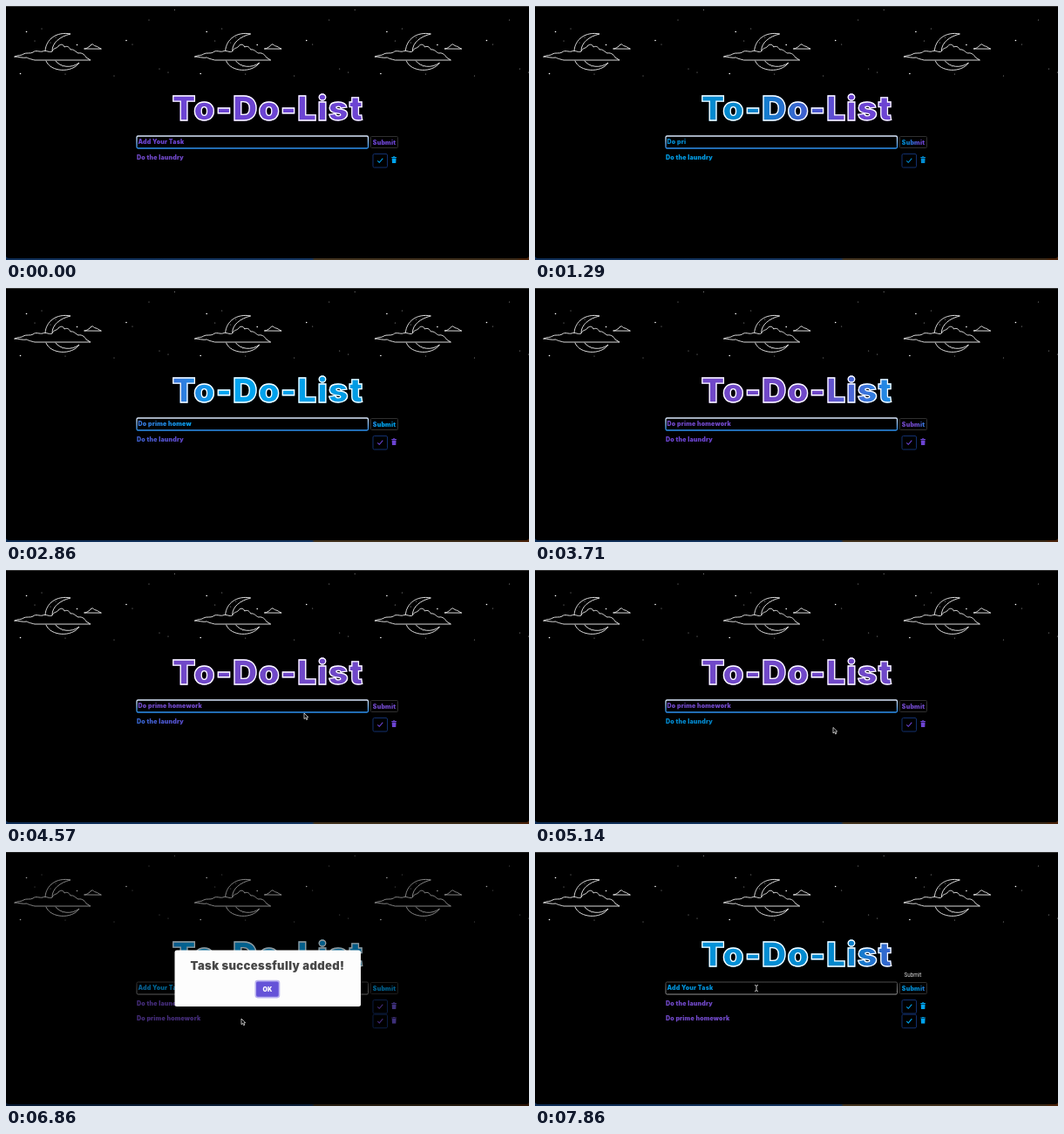
These frames come from a looping animation (600 px wide and 291 px high, 8000 ms). An HTML page:

```html
<!DOCTYPE html>
<html lang="en">
<head>
<meta charset="utf-8">
<title>To-Do-List</title>
<style>
  html, body { margin: 0; width: 100%; height: 100%; overflow: hidden; background: #000; }
  #stage { position: relative; width: 600px; height: 291px; overflow: hidden; background: #000; }
  svg { position: absolute; left: 0; top: 0; }
  .shine, text { font-family: Inter, "Liberation Sans", sans-serif; font-weight: 900; letter-spacing: .027em; }
  text { text-anchor: middle; }
  .shine {
    position: absolute; height: 14px; line-height: 14px; font-size: 7px;
    white-space: pre; color: transparent;
    background: linear-gradient(to right, #7048c8 20%, #00a5f0 30%, #0287cc 70%, #6c44d2 80%) 0 50% / 500% 100%;
    -webkit-background-clip: text; background-clip: text;
  }
  #title {
    left: 300.5px; top: 92px; height: 49px; line-height: 49px; font-size: 38.9px;
    transform: translateX(-50%); -webkit-text-stroke: 1.3px #fff;
  }
  #field { left: 150px; top: 149px; width: 266px; text-indent: 1.6px; }
  #submit { left: 418px; top: 149.5px; width: 32px; text-align: center; }
  .row { left: 150px; width: 300px; }
</style>
</head>
<body>
<div id="stage">
  <svg width="600" height="291" fill="none">
    <defs>
      <g id="sky">
        <g stroke="#f2f2f2" stroke-width=".9" stroke-linejoin="round" stroke-linecap="round">
          <path d="M45 51C46 38 58 29 74 32C62 35 53 42 53 51"/>
          <path d="M10 58C14 56 18 57 20 55C23 53 28 55 31 53C34 50 39 53 42 52C46 50 50 54 53 52C55 47 59 49 60 46C63 43 66 44 67 47C71 45 73 48 74 50C78 49 80 53 83 54C88 53 91 57 92 59L97 62H33C29 61 25 60 24 59C19 60 15 58 10 58Z"/>
          <path d="M46 63C51 76 76 77 84 65C75 72 62 70 57 63"/>
          <path d="M90 49C93 49 94 47 95 47L98 44C100 43 101 46 103 46C105 46 106 48 109 49Z"/>
        </g>
        <path id="stars" stroke="#fff" stroke-width="1.6" stroke-linecap="round"/>
        <path id="dimStars" stroke="#999" stroke-width="1.1" stroke-linecap="round"/>
      </g>
      <linearGradient id="focused" x2="0" y2="1">
        <stop stop-color="#dbe8fb"/><stop offset="1" stop-color="#2a8fee"/>
      </linearGradient>
      <linearGradient id="blurred" x2="0" y2="1">
        <stop stop-color="#4a4a4a"/><stop offset="1" stop-color="#959595"/>
      </linearGradient>
      <linearGradient id="dock">
        <stop stop-color="#0d2c55"/><stop offset=".585" stop-color="#143560"/>
        <stop offset=".59" stop-color="#43341f"/><stop offset=".975" stop-color="#3a2a18"/>
        <stop offset=".985" stop-color="#4a230a"/>
      </linearGradient>
    </defs>
    <path d="M0 .5H600" stroke="#343434"/>
    <rect y="287" width="600" height="4" fill="url(#dock)"/>
    <path d="M0 280V286Q0 289 4 289H596Q600 289 600 286V280Z" fill="#000"/>
    <use href="#sky"/><use href="#sky" x="206.7"/><use href="#sky" x="413.4"/>
    <rect id="box" x="150" y="149" width="265.5" height="14" rx="1.5"/>
    <rect x="418.5" y="149.5" width="31" height="13" rx="1" stroke="#303030"/>
    <g id="tools">
      <rect x="421" y="169.5" width="16.5" height="15.5" rx="1.5" stroke="#12306e"/>
      <path id="check" d="M426.3 177.3l2 2l4-4.7" stroke-width="1.1"/>
      <path id="bin" d="M442.3 173h1.6l.5-.7h1.5l.5.7h1.6v1h-5.7zM442.7 174.5h4.9l-.3 5.5h-4.3z"/>
    </g>
    <use id="tools2" href="#tools" y="16.6"/>
  </svg>

  <div id="title" class="shine main">To-Do-List</div>
  <div id="field" class="shine main"></div>
  <div id="submit" class="shine main">Submit</div>
  <div class="shine row" style="top:167px">Do the laundry</div>
  <div id="row2" class="shine row" style="top:183.6px">Do prime homework</div>

  <svg width="600" height="291" fill="none">
    <text id="tip" x="433.5" y="142.5" fill="#ddd" style="font:400 6.3px Roboto,sans-serif;letter-spacing:0">Submit</text>
    <rect id="shade" width="600" height="291" fill="#000"/>
    <g id="ask">
      <rect x="193.5" y="76.5" width="213.5" height="136.5" rx="2.5" fill="#fdfdfd"/>
      <!-- Success mark, in units of 1/5 of its inner size -->
      <g transform="translate(283 95) scale(6.8)" stroke="#a98a66" stroke-width=".25">
        <circle cx="2.5" cy="2.5" r="2.625" opacity=".3"/>
        <path id="arc"/>
        <g fill="#a98a66" stroke="none">
          <rect id="markTip" height=".3125" rx=".125"/>
          <rect id="markLong" height=".3125" rx=".125"/>
        </g>
      </g>
      <g font-size="13.4" fill="#484848">
        <text x="300" y="156.2">Do you want to add the</text><text x="300" y="171.2">task?</text>
      </g>
      <rect x="256.7" y="183.7" width="28.6" height="19.2" rx="2.5" fill="#b23ca8" stroke="#c9a6ec" stroke-width="1.6"/>
      <rect x="289" y="184" width="54" height="18.5" rx="2" fill="#d92a2a"/>
      <g font-size="7" fill="#fff">
        <text x="271" y="196">Yes</text><text x="316" y="196">No, cancel</text>
      </g>
    </g>
    <g id="done">
      <rect x="193.5" y="112.5" width="213.5" height="64.5" rx="2.5" fill="#fdfdfd"/>
      <text x="300" y="135" font-size="13.1" fill="#484848">Task successfully added!</text>
      <rect x="286.3" y="147.6" width="27.2" height="19" rx="2.5" fill="#6553d8" stroke="#b9b1f0" stroke-width="1.6"/>
      <text x="300" y="159.6" font-size="7" fill="#fff">OK</text>
    </g>
    <path id="arrow" d="M0 0V6.6L1.6 5.2L2.7 7.6L3.8 7.1L2.8 4.8L4.7 4.6Z" fill="#000" stroke="#fff" stroke-width=".7"/>
    <path id="beam" d="M-2-3.4Q0-3.4 0-2.4Q0-3.4 2-3.4M0-2.6V2.6M-2 3.4Q0 3.4 0 2.4Q0 3.4 2 3.4" stroke="#ddd" stroke-width=".9"/>
  </svg>
</div>
<script>
const LOOP = 8000, ASK = 5225, ADDED = 6430, CLOSE = 7300;
const TASK = "Do prime homework";
const $ = id => document.getElementById(id);
const clamp = x => Math.min(1, Math.max(0, x));
const show = (el, on) => { el.style.display = on ? "" : "none"; };
const setAttrs = (el, attrs) => Object.entries(attrs).forEach(([k, v]) => el.setAttribute(k, v));

const dots = list => list.map(([x, y]) => `M${x} ${y}h.01`).join("");
$("stars").setAttribute("d", dots([[23.5, 29.5], [81.5, 44.5], [16.5, 77.5], [138, 39.5]]));
$("dimStars").setAttribute("d", dots([[41, 26], [33, 40], [145, 44], [193.5, 4.5],
  [164, 16], [176, 72], [124, 80], [68, 78], [51, 42], [57, 36], [65, 69], [186, 76]]));

// CSS-style cubic-bezier(x1, 0, x2, 1)
function bezier(x1, x2, x) {
  let lo = 0, hi = 1;
  for (let i = 0; i < 24; i++) {
    const s = (lo + hi) / 2, r = 1 - s;
    if (3 * x1 * r * r * s + 3 * x2 * r * s * s + s ** 3 < x) lo = s; else hi = s;
  }
  return lo * lo * (3 - 2 * lo);
}

// Alternating five-second sweep of the gradient, 0 to 1
function sway(ms) {
  const u = ms / 5000 % 2;
  return bezier(.42, .58, u < 1 ? u : 2 - u);
}

// Linear interpolation through [position, ...values] stops
function track(stops, x) {
  let i = 1;
  while (i < stops.length - 1 && x > stops[i][0]) i++;
  const a = stops[i - 1], b = stops[i], k = clamp((x - a[0]) / (b[0] - a[0]));
  return a.slice(1).map((v, j) => v + (b[j + 1] - v) * k);
}

const COLORS = [[.2, 112, 72, 200], [.3, 0, 165, 240], [.7, 2, 135, 204], [.8, 108, 68, 210]];
const POP = [[0, .7], [.45, 1.05], [.8, .95], [1, 1]];
// Check mark strokes: progress, top, side offset, width
const MARK_TIP = [[.54, 1.0625, .125, 0], [.7, 2.1875, -.375, 3.125], [.84, 3, 1.3125, 1.0625], [1, 2.8125, .8125, 1.5625]];
const MARK_LONG = [[.65, 3.375, 2.875, 0], [.84, 2.1875, 0, 3.4375], [1, 2.375, .5, 2.9375]];
const MOUSE = [[4200, 350, 174], [4500, 342, 164], [4700, 342, 164], [5400, 342, 190], [5750, 342, 190],
  [6250, 270, 191], [7200, 270, 191], [7650, 254, 156]];

const tint = (sweep, place) => `rgb(${track(COLORS, .8 * sweep + .2 * place).map(Math.round)})`;

function slide(selector, sweep) {
  document.querySelectorAll(selector).forEach(el => {
    el.style.backgroundPosition = `${sweep * 100}% 50%`;
  });
}

function popup(el, t, open, close, fade) {
  const leaving = clamp((t - close) / fade);
  show(el, t >= open && leaving < 1);
  const scale = track(POP, (t - open) / 300)[0] * (1 - leaving / 2);
  setAttrs(el, {
    transform: `translate(300 144.75) scale(${scale}) translate(-300 -144.75)`,
    opacity: clamp((t - open) / 100) * (1 - leaving)
  });
}

const placeStroke = (el, x, y, width, angle) => setAttrs(el, {
  x, y, width, transform: `rotate(${angle} ${x + width / 2} ${y + .156})`
});

// A cover turns once anticlockwise and bares part of the ring, then the check is drawn
function successMark(ms) {
  const turn = 360 * bezierIn(clamp((ms - 212) / 298));
  const [from, to] = turn < 180 ? [135 - turn, 135] : [-45, 315 - turn];
  const point = deg => {
    const a = deg * Math.PI / 180;
    return `${2.5 + 2.625 * Math.sin(a)} ${2.5 - 2.625 * Math.cos(a)}`;
  };
  $("arc").setAttribute("d", to > from ? `M${point(from)}A2.625 2.625 0 0 1 ${point(to)}` : "");

  const [tipTop, tipLeft, tipWidth] = track(MARK_TIP, ms / 750);
  const [longTop, longRight, longWidth] = track(MARK_LONG, ms / 750);
  placeStroke($("markTip"), tipLeft, tipTop, tipWidth, 45);
  placeStroke($("markLong"), 5 - longRight - longWidth, longTop, longWidth, -45);
}

function bezierIn(x) { return bezier(.42, 1, x); }

function draw(t) {
  const added = t >= ADDED, focused = t < ASK;
  const rowSweep = sway(added ? t - ADDED : t + 1320);
  slide(".main", sway(t + 5210));
  slide(".row", rowSweep);
  $("check").setAttribute("stroke", tint(rowSweep, .93));
  $("bin").setAttribute("fill", tint(rowSweep, .98));

  const typed = TASK.slice(0, Math.max(0, Math.floor((t - 50) / 195)));
  $("field").textContent = added || !typed ? "Add Your Task" : typed;
  setAttrs($("box"), { stroke: `url(#${focused ? "focused" : "blurred"})`, "stroke-width": focused ? 1.3 : 1 });
  show($("row2"), added);
  show($("tools2"), added);
  show($("tip"), t >= CLOSE + 150);

  $("shade").setAttribute("opacity", .4 * clamp((t - ASK) / 100) * (1 - clamp((t - CLOSE) / 150)));
  popup($("ask"), t, ASK, ADDED, 1);
  popup($("done"), t, ADDED, CLOSE, 150);
  successMark(t - ASK);

  const [x, y] = track(MOUSE, t), overField = t > CLOSE && y < 163;
  show($("arrow"), t >= MOUSE[0][0] && !overField);
  show($("beam"), overField);
  for (const id of ["arrow", "beam"]) $(id).setAttribute("transform", `translate(${x} ${y})`);
}

function frame() {
  draw(performance.now() % LOOP);
  requestAnimationFrame(frame);
}
frame();
</script>
</body>
</html>
```
